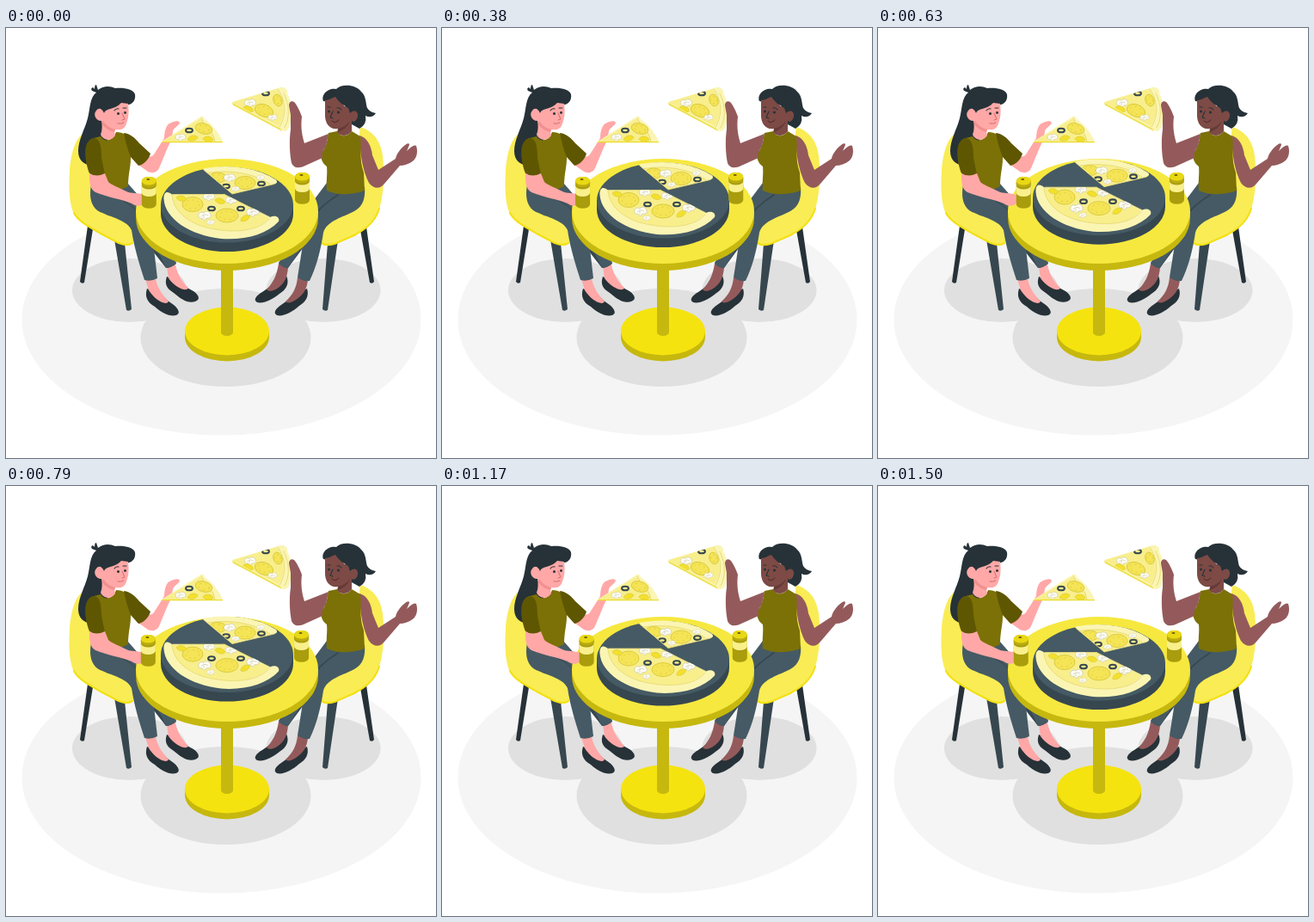
Write an HTML page that moves like this. It is 500 px wide and 500 px high and loops after 1540 ms.

```html
<!DOCTYPE html>
<html lang="en">
<head>
<meta charset="utf-8">
<title>Sharing a pizza</title>
<style>
html, body { margin: 0; width: 100%; height: 100%; overflow: hidden; background: #fff; }
svg { display: block; width: 100%; height: 100%; }
.dark { fill: #263238; } .slate { fill: #37474f; } .jeans { fill: #455a64; }
.pink { fill: #ffa8a7; } .brown { fill: #945a5b; } .face2 { fill: #7d4a45; }
.sleeve { fill: #5f5602; } .shirt { fill: #7b7107; }
.shell { fill: #f9ec55; } .gold { fill: #f5e30f; } .rim { fill: #c6b80e; }
.crust { fill: #fbf5b4; } .cheese { fill: #f8ee8c; }
.shadow { fill: #e0e0e0; }
.line { fill: none; stroke-linecap: round; stroke-linejoin: round; }
</style>
</head>
<body>
<svg viewBox="0 0 500 500" xmlns="http://www.w3.org/2000/svg">
  <defs>
    <clipPath id="pizza-cut">
      <path d="M263 192.500L229.500 164A77 44 0 0 1 315 177L312 181Z"/>
      <path d="M183 193.500H254L313 222L300 240L250 246L200 230Z"/>
    </clipPath>
    <clipPath id="hand-cut">
      <path d="M181 132.500L227 103L232 106L252 132.500Z"/>
      <path d="M263 86L321 69L333 88L326 121Z"/>
    </clipPath>
  </defs>

  <ellipse cx="250.500" cy="339" rx="232" ry="134.500" fill="#f5f5f5"/>
  <ellipse class="shadow" cx="143.500" cy="305" rx="66.500" ry="37"/>
  <ellipse class="shadow" cx="369" cy="305" rx="66.500" ry="37"/>
  <ellipse class="shadow" cx="255.500" cy="360" rx="99" ry="57"/>

  <g id="chairs">
    <path class="dark" d="M95 230L101 234L91 296Q88 298 86 295ZM419 231L412 235L423 296Q426 298 428 295Z"/>
    <path class="slate" d="M126 246L138 250L146 327Q143 330 140 328ZM386 247L374 251L368 327Q371 330 374 328Z"/>
    <path class="shell" d="M92 121C81 127 76 143 74 165C73 185 73 200 78 214C83 225 98 232 110 239L131 250C138 254 145 254 148 250L150 228L120 190L100 130Z"/>
    <path class="shell" d="M412 115C424 119 435 128 438 148C440 166 440 188 435 207C431 225 420 233 405 241L382 251C375 254 369 254 366 250L366 228L395 190L410 130Z"/>
    <path class="line" stroke="#f3e010" stroke-width="2" d="M79 215C84 225 98 232 110 239L131 250Q141 254 147 250M434 210C429 226 418 234 405 241L382 251Q372 254 367 250"/>
  </g>

  <g id="left-woman">
    <path class="dark" d="M105 75L100 73Q98 70 101 69L103 71Q103 66 105 66L107 72C113 67 121 67 127 70C137 69 148 71 150 77C151 83 148 88 143 89L125 95L114 112L119 128L106 158C94 162 84 156 84 143C84 130 92 117 95 105C98 94 97 81 105 75Z"/>
    <path class="dark" d="M187 289C184 298 187 303 195 308C203 315 212 321 220 318C226 316 225 311 218 306Q212 303 206 299ZM164 303C161 312 164 319 173 324C181 331 190 336 198 334C203 332 201 327 195 322Q188 318 182 311Z"/>
    <path class="pink" d="M187 278L197 275C199 285 203 293 212 302C210 308 196 301 189 291ZM162 292L174 290C175 299 179 307 189 318C186 324 172 315 166 305Z"/>
    <path class="slate" d="M164 230L186 255L198 274Q192 279 186 279L168 256Z"/>
    <path class="jeans" d="M101 174C95 195 98 210 112 215C125 221 141 224 146 235C149 256 156 277 161 293Q169 295 176 291L171 248L186 279Q193 278 198 273L187 250L163 205L141 180Z"/>
    <path class="line" stroke="#37474f" stroke-width="1" d="M118 193Q150 203 162 226Q168 238 170 250"/>
    <path class="shirt" d="M110 126C114 133 124 132 128 121C136 121 143 125 147 133L145 152C145 162 142 170 142 184C130 191 115 192 106 188L96 158C92 142 94 130 102 128Z"/>
    <path class="pink" d="M151 157L162 147Q168 152 172 147L184 128C184 121 186 113 190 111C195 108 201 107 202 110C201 114 195 116 194 120C193 128 191 133 188 139L178 163C175 169 169 169 165 167Z"/>
    <path class="sleeve" d="M137 122C145 123 150 128 155 134L168 146C166 153 160 159 154 160L145 150Q140 138 137 122Z"/>
    <path class="sleeve" d="M101 128C109 127 111 137 111 151L115 170Q105 175 97 169C91 153 89 132 101 128Z"/>
    <path class="pink" d="M115 97C119 93 128 94 134 87L142 88C143 95 143 104 140 111C138 118 133 119 127 118C126 120 126 123 127 125C123 132 113 131 110 124C112 119 112 113 111 108C104 108 101 100 105 96C108 92 112 94 114 99Z"/>
    <path fill="#f28f8f" d="M113 108Q118 116 127 118L126 121Q117 119 112 112Z"/>
    <g class="dark"><circle cx="130.500" cy="99.500" r="1.500"/><circle cx="138.500" cy="98.500" r="1.400"/></g>
    <path class="line" stroke="#263238" stroke-width="1.100" d="M126 96Q128 93 131 94M136 93L140 93"/>
    <path class="line" stroke="#d66b6c" stroke-width="1" d="M135 99L138 106L135 107M130 111Q134 112 137 110"/>
  </g>

  <g id="right-woman">
    <path class="dark" d="M326 288C330 297 326 304 318 309C309 316 299 321 292 319C287 316 291 311 298 307Q304 303 309 299ZM350 303C353 312 348 319 341 323C332 331 322 336 315 334C310 331 314 326 320 322Q328 317 333 311Z"/>
    <path class="brown" d="M317 274L328 279C327 288 325 294 321 298C315 305 306 308 303 304C310 297 315 288 317 274ZM339 290L351 293C350 300 349 304 345 309C338 317 328 322 325 318C333 311 338 302 339 290Z"/>
    <path class="slate" d="M352 228L330 255L317 273Q322 279 328 279L345 256Z"/>
    <path class="jeans" d="M373 180L352 208L328 255L317 274Q322 279 328 279L345 252L339 290Q345 295 353 294C361 278 366 258 369 238C373 224 392 220 405 213C416 207 418 196 417 185Z"/>
    <path class="line" stroke="#37474f" stroke-width="1.500" d="M386 194Q364 208 354 224Q347 238 345 252"/>
    <path class="brown" d="M411 125C420 127 425 138 426 148L433 165L453 152C454 147 458 141 463 137C466 134 469 133 469 136L466 143C470 139 475 135 477 137C479 143 478 150 474 154C469 158 463 160 458 160L440 181C435 188 427 187 422 180C415 165 412 151 411 125Z"/>
    <path class="shirt" d="M385 120C388 127 397 127 402 120L412 126C414 138 410 152 416 168L417 189C405 194 385 195 373 189C372 178 374 170 373 161C367 157 365 149 367 145C374 137 373 130 375 122Z"/>
    <path class="dark" d="M369 85C366 77 375 69 384 71C390 64 408 66 413 74C419 79 418 87 420 93Q423 98 430 99C427 104 422 104 418 102Q420 112 411 117L402 112L394 90Z"/>
    <path class="face2" d="M371 84C376 84 379 81 383 80C387 86 393 91 398 93L400 99C405 94 410 97 409 103C408 108 404 110 402 108L402 120C397 127 388 126 385 121L386 117C377 119 371 111 371 102Z"/>
    <path fill="#653a37" d="M386 117Q395 115 400 108Q397 117 386 121Z"/>
    <g class="dark"><circle cx="375.500" cy="97" r="1.500"/><circle cx="386.500" cy="98" r="1.600"/></g>
    <path class="line" stroke="#263238" stroke-width="1.100" d="M374 92L377 92M385 93Q388 92 390 95M380 97L377 104L380 105"/>
    <path class="line" stroke="#4d2529" stroke-width="1" d="M379 108Q382 112 387 107"/>
  </g>

  <g id="table">
    <path class="rim" d="M208 352.500V359.500A49 28 0 0 0 306 359.500V352.500Z"/>
    <ellipse class="gold" cx="257" cy="352.500" rx="49" ry="28"/>
    <path class="rim" d="M250 270V354A7 4 0 0 0 264 354V270Z"/>
    <path class="rim" d="M151 213V221A106 61 0 0 0 363 221V213Z"/>
    <ellipse cx="257" cy="213" rx="106" ry="61" fill="#f6e83f"/>
  </g>
  <path class="pink" d="M97 169C97 178 97 187 104 191C118 197 135 199 146 204C150 207 156 208 161 204L161 194C152 191 146 193 140 190C132 186 122 182 119 179L115 169Q105 174 97 169Z"/>

  <g id="pizza">
    <path class="slate" d="M180 205.500V216A77 44 0 0 0 334 216V205.500Z"/>
    <ellipse class="jeans" cx="257" cy="205.500" rx="77" ry="44"/>
    <path class="crust" d="M263 193L229.500 165Q229 163 232 163A77 44 0 0 1 314 176.500Q317 180 312 181.500Z"/>
    <path class="cheese" d="M263 192.500L234 168.500A68 38 0 0 1 307 181.500Z"/>
    <path class="crust" d="M183.500 199C183 190 188 189 193 193.500L254 193.500L307 220C313 217 319 220 317 225C303 240 278 247 250 245C214 241 185 222 183.500 199Z"/>
    <path class="cheese" d="M193 194L254 193.500L306 221C293 237 264 238 243 234C215 230 194 214 193 194Z"/>
    <path class="line" stroke="#e5d873" stroke-width=".8" d="M193 194C194 214 215 230 243 234C264 238 293 237 306 222M254 193.500L307 220M194 193.500H254M234 168.500A68 38 0 0 1 307 181.500M230 165L263 193L312 181.500"/>
    <g id="toppings" clip-path="url(#pizza-cut)"></g>
  </g>

  <g id="hand-slices">
    <path class="crust" d="M181 132L225 104Q229 100 231 106C239 111 248 122 252 132L250 133H181Z"/>
    <path class="cheese" d="M182 132L227 105Q230 113 238 120Q242 125 243 132Z"/>
    <path fill="#ecdd2c" d="M181 132H252V133.300H182Z"/>
    <path class="crust" d="M263 86L319 69C325 68 328 73 327 76C334 88 334 106 328 118Q324 122 319 118L264 90Z"/>
    <path class="cheese" d="M264 86L315 71C324 84 326 100 317 114L264 87Z"/>
    <path fill="#eee04a" d="M263 87L319 117L321 120L264 89.500Z"/>
    <path class="line" stroke="#e5d873" stroke-width=".9" d="M316 71C325 84 327 100 318 115M227 105Q230 113 238 120Q242 125 243 132M323 76C330 90 330 105 324 116"/>
    <g id="hand-toppings" clip-path="url(#hand-cut)"></g>
  </g>
  <path class="brown" d="M375 123L347 134C343 121 343 112 344 103C342 97 338 89 335 86C332 84 329 86 329 90L331 101L331 118C329 132 330 147 332 157C335 164 342 163 348 160L368 151Q366 145 372 138Z"/>

  <g id="shaker-a"></g>
  <g id="shaker-b"></g>
</svg>
<script>
const $ = id => document.getElementById(id);

const pepperoni = (x, y, rx, ry, turn = 0) =>
  `<g transform="translate(${x} ${y}) rotate(${turn})">
    <ellipse rx="${rx}" ry="${ry}" fill="#f4e456" stroke="#d8c83a" stroke-width=".9"/>
    <ellipse rx="${rx * 0.65}" ry="${ry * 0.6}" fill="none" stroke="#dccb34" stroke-width=".8" stroke-dasharray="2 4"/></g>`;

const olive = (x, y) =>
  `<ellipse cx="${x}" cy="${y}" rx="3.900" ry="2.300" fill="#f8ee8c" stroke="#37474f" stroke-width="2.100"/>`;

const mushroom = (x, y, size = 1) =>
  `<g transform="translate(${x} ${y}) scale(${size})">
    <path d="M-7 1C-8-3-4-5-1-3C1-6 6-5 7-1C8 2 5 4 2 3C1 6-2 6-3 3C-5 4-7 3-7 1Z" fill="#fffef4" stroke="#c4c2b0" stroke-width=".7"/>
    <path d="M-4 1Q0-3 4 0M-1 0V3" class="line" stroke="#c4c2b0" stroke-width=".7"/></g>`;

const pepper = (x, y, turn) =>
  `<path transform="translate(${x} ${y}) rotate(${turn})" d="M-6 1C-4-4 4-4 6 0C4 4-3 4-6 1Z" fill="#f3e02c" stroke="#d8c83a" stroke-width=".6"/>`;

$("toppings").innerHTML =
  pepperoni(278, 180, 12, 7.5) + pepperoni(246, 174, 10, 6) +
  mushroom(260, 174, 0.9) + mushroom(267, 187, 0.6) + mushroom(296, 174, 0.6) +
  olive(256, 184) + olive(297, 181) +
  pepperoni(217, 205, 12, 8.5) + pepperoni(257, 218, 13, 8) +
  pepper(249, 201, 20) + pepper(278, 221, -25) + pepper(204, 198, 15) +
  mushroom(236, 196, 0.9) + mushroom(231, 218) + mushroom(262, 200, 0.9) + mushroom(287, 214) +
  mushroom(238, 226, 0.6) + olive(239, 210) + olive(273, 210);

$("hand-toppings").innerHTML =
  pepperoni(230, 117, 10, 6, 15) + mushroom(203, 127, 0.8) +
  pepper(217, 128, -10) + pepper(235, 129, 10) + olive(213, 119) +
  pepperoni(300, 96, 11, 7, 20) + pepperoni(316, 84, 5, 7, -20) +
  mushroom(284, 87, 0.9) + mushroom(310, 104, 0.7) + pepper(282, 94, 25) + olive(302, 76);

const shaker = `
  <path d="M-8.500 6V32A8.500 4.800 0 0 0 8.500 32V6Z" fill="#a99c0d"/>
  <path d="M-8.500 10A8.500 4.500 0 0 0 8.500 10V18.500A8.500 4.500 0 0 1-8.500 18.500Z" fill="#f9f08c"/>
  <path d="M-8.500 6C-8.500 2-5 0 0 0S8.500 2 8.500 6V8A8.500 4.500 0 0 1-8.500 8Z" fill="#b9ab10"/>
  <path d="M-8.500 5C-8.500 2-5 0 0 0S8.500 2 8.500 5A8.500 4.500 0 0 1-8.500 5Z" fill="#e9d814"/>
  <ellipse cx="-1" cy="3" rx="2" ry="1" fill="#675e02"/>`;
$("shaker-a").innerHTML = $("shaker-b").innerHTML = shaker;

const bezier = (a, b, s) => 3 * a * s * (1 - s) ** 2 + 3 * b * s * s * (1 - s) + s ** 3;

function ease(x) {
  let lo = 0, hi = 1;
  for (let i = 0; i < 20; i++) {
    const mid = (lo + hi) / 2;
    if (bezier(0.36, 0.19, mid) < x) lo = mid; else hi = mid;
  }
  return bezier(0.07, 0.97, lo);
}

const stops = [0, -1, 2, -4, 4, -4, 4, -4, 2, -1, 0];

function shake(p) {
  const i = Math.min(9, Math.floor(p * 10));
  return stops[i] + (stops[i + 1] - stops[i]) * ease(p * 10 - i);
}

const LOOP = 1540, STEPS = 36, STEP = 1500 / STEPS;

function draw(ms) {
  const step = Math.min(STEPS, Math.floor((ms % LOOP + 4) / STEP));
  const p = step / STEPS;
  const lift = 10 * (1 - Math.abs(1 - 2 * p));
  const dx = shake(p);
  $("pizza").setAttribute("transform", `translate(0 ${-lift})`);
  $("shaker-a").setAttribute("transform", `translate(${166.3 + dx} 173)`);
  $("shaker-b").setAttribute("transform", `translate(${344.5 + dx} 168)`);
}

const start = performance.now();
function tick() {
  draw(performance.now() - start);
  requestAnimationFrame(tick);
}
tick();
</script>
</body>
</html>
```
